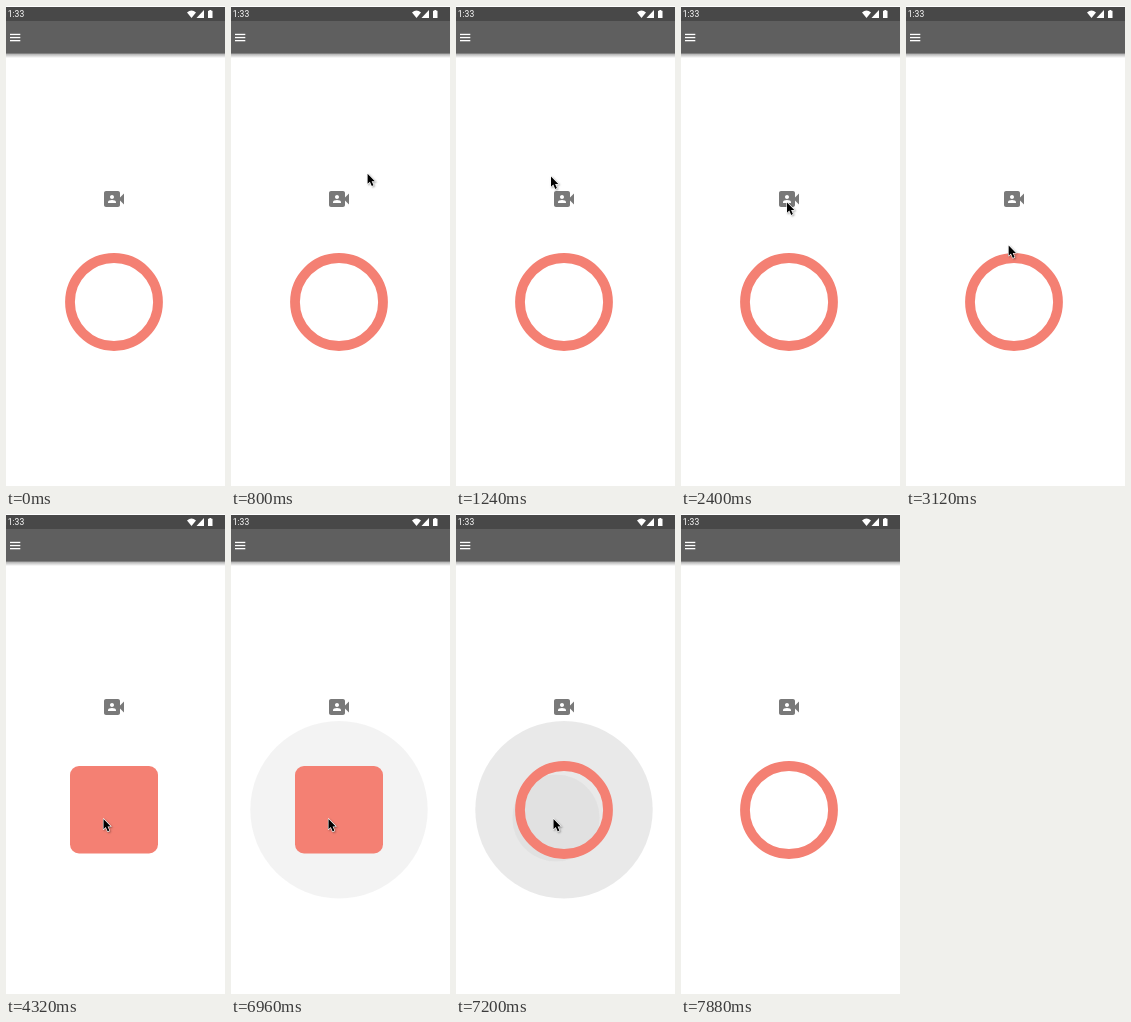
An HTML page with a canvas for the animation above (8000 ms loop, 219x480 px).

```html
<!DOCTYPE html>
<html lang="en">
<head>
<meta charset="utf-8">
<title>Record button</title>
<style>
  html, body { margin: 0; width: 100%; height: 100%; overflow: hidden; background: #fff; }
  canvas { display: block; width: 219px; height: 480px; }
</style>
</head>
<body>
<canvas id="stage" width="219" height="480"></canvas>
<script>
const ctx = document.getElementById('stage').getContext('2d');
const LOOP = 8000, STEP = 40;
const CENTER = { x: 108, y: 296 };
const SALMON = '#f48073';

const cameraIcon = new Path2D(
  'M18 10.48V6c0-1.1-.9-2-2-2H4C2.9 4 2 4.9 2 6v12c0 1.1.9 2 2 2h12c1.1 0 2-.9 2-2v-4.48l4 3.98v-11z' +
  'M10 8c1.1 0 2 .9 2 2s-.9 2-2 2-2-.9-2-2 .9-2 2-2z' +
  'M14 16H6v-.57c0-.81.48-1.53 1.22-1.85C8.07 13.21 9.01 13 10 13s1.93.21 2.78.58c.74.32 1.22 1.04 1.22 1.85z');
const arrow = new Path2D('M0 0V10.2L2.3 8.1L4.2 12.4L5.9 11.6L4.1 7.5H7.3Z');
const wifi = new Path2D('M181 6.4Q185.5 2.6 190 6.4L185.5 12Z');
const signal = new Path2D('M198 4V12H190.5Z');

// Pointer keys: time, x, y
const pointerKeys = [
  [680, 204, 156], [760, 148, 164], [880, 104, 178],
  [1120, 104, 178], [1240, 95, 170.5], [1320, 95, 170.5], [1520, 112, 176],
  [2360, 112, 176], [2400, 106, 196.5], [2520, 106, 196.5],
  [2680, 114, 189], [2840, 106, 197],
  [3000, 106, 197], [3280, 97.5, 305],
  [7720, 97.5, 305], [7760, 84, 272], [7800, 47, 193], [7840, 1, 113]
];

// Each press: ink starts, finger lifts, ink has gone
const presses = [
  { down: 3680, up: 3860, end: 4040 },
  { down: 6960, up: 7160, end: 7360 }
];

const clamp = v => Math.max(0, Math.min(1, v));
const lerp = (a, b, p) => a + (b - a) * p;

function disc(x, y, r, color) {
  ctx.fillStyle = color;
  ctx.beginPath();
  ctx.arc(x, y, r, 0, Math.PI * 2);
  ctx.fill();
}

function rect(x, y, w, h, color) {
  ctx.fillStyle = color;
  ctx.fillRect(x, y, w, h);
}

function drawHeader() {
  const shadow = ctx.createLinearGradient(0, 47, 0, 52);
  shadow.addColorStop(0, 'rgba(0,0,0,.38)');
  shadow.addColorStop(1, 'rgba(0,0,0,0)');
  rect(0, 47, 219, 5, shadow);
  rect(0, 1, 219, 14, '#484848');
  rect(0, 15, 219, 32.5, '#5f5f5f');

  ctx.fillStyle = '#fff';
  ctx.font = '8.5px Roboto, sans-serif';
  ctx.fillText('11:33', -3, 11.3);
  ctx.fill(wifi);
  ctx.fill(signal);
  rect(202, 4.8, 4.5, 7.2, '#fff');
  rect(203.3, 4, 2, 1, '#fff');
  for (const y of [27.8, 30.9, 34]) rect(4, y, 10.3, 1.3, '#fff');
}

function drawCamera() {
  ctx.save();
  ctx.translate(96, 181);
  ctx.fillStyle = '#797979';
  ctx.fill(cameraIcon, 'evenodd');
  ctx.restore();
}

function drawInk(t) {
  const press = presses.find(p => t >= p.down && t < p.end);
  if (!press) return;
  const held = t - press.down;
  const fade = 1 - clamp((t - press.up) / (press.end - press.up));
  const highlight = 0.4 * clamp(0.45 + held / 200) * fade;
  const radius = 3 + Math.min(held, press.up - press.down) * 0.095
    + Math.max(0, t - press.up) * 0.54;

  ctx.save();
  ctx.beginPath();
  ctx.arc(CENTER.x, CENTER.y - 0.3, 88.7, 0, Math.PI * 2);
  ctx.clip();
  rect(0, 200, 219, 190, `rgba(188,188,188,${highlight})`);
  disc(100, 304, radius, `rgba(200,200,200,${0.3 * fade})`);
  ctx.restore();
}

function drawButton(t) {
  if (t >= presses[0].up && t < presses[1].up) {
    ctx.fillStyle = SALMON;
    ctx.beginPath();
    ctx.roundRect(64, 252, 88, 87.5, 9);
    ctx.fill();
  } else {
    ctx.strokeStyle = SALMON;
    ctx.lineWidth = 9.8;
    ctx.beginPath();
    ctx.arc(CENTER.x, CENTER.y, 44, 0, Math.PI * 2);
    ctx.stroke();
  }
}

function drawPointer(t) {
  const i = pointerKeys.findIndex(k => k[0] > t);
  const last = pointerKeys[pointerKeys.length - 1];
  if (i === 0 || t >= last[0] + STEP) return;
  const a = i < 0 ? last : pointerKeys[i - 1];
  const b = i < 0 ? last : pointerKeys[i];
  const p = a === b ? 0 : (t - a[0]) / (b[0] - a[0]);
  const eased = p * p * (3 - 2 * p);

  ctx.save();
  ctx.translate(lerp(a[1], b[1], eased), lerp(a[2], b[2], eased));
  ctx.shadowColor = 'rgba(0,0,0,.35)';
  ctx.shadowBlur = 2;
  ctx.shadowOffsetX = ctx.shadowOffsetY = 1;
  ctx.strokeStyle = '#fff';
  ctx.lineWidth = 1.2;
  ctx.lineJoin = 'round';
  ctx.stroke(arrow);
  ctx.shadowColor = 'transparent';
  ctx.fillStyle = '#000';
  ctx.fill(arrow);
  ctx.restore();
}

const start = performance.now();

function render() {
  const elapsed = Math.max(0, performance.now() - start) % LOOP;
  const t = Math.floor(elapsed / STEP) * STEP;
  rect(0, 0, 219, 480, '#fff');
  drawHeader();
  drawCamera();
  drawInk(t);
  drawButton(t);
  drawPointer(t);
  requestAnimationFrame(render);
}
render();
</script>
</body>
</html>
```
